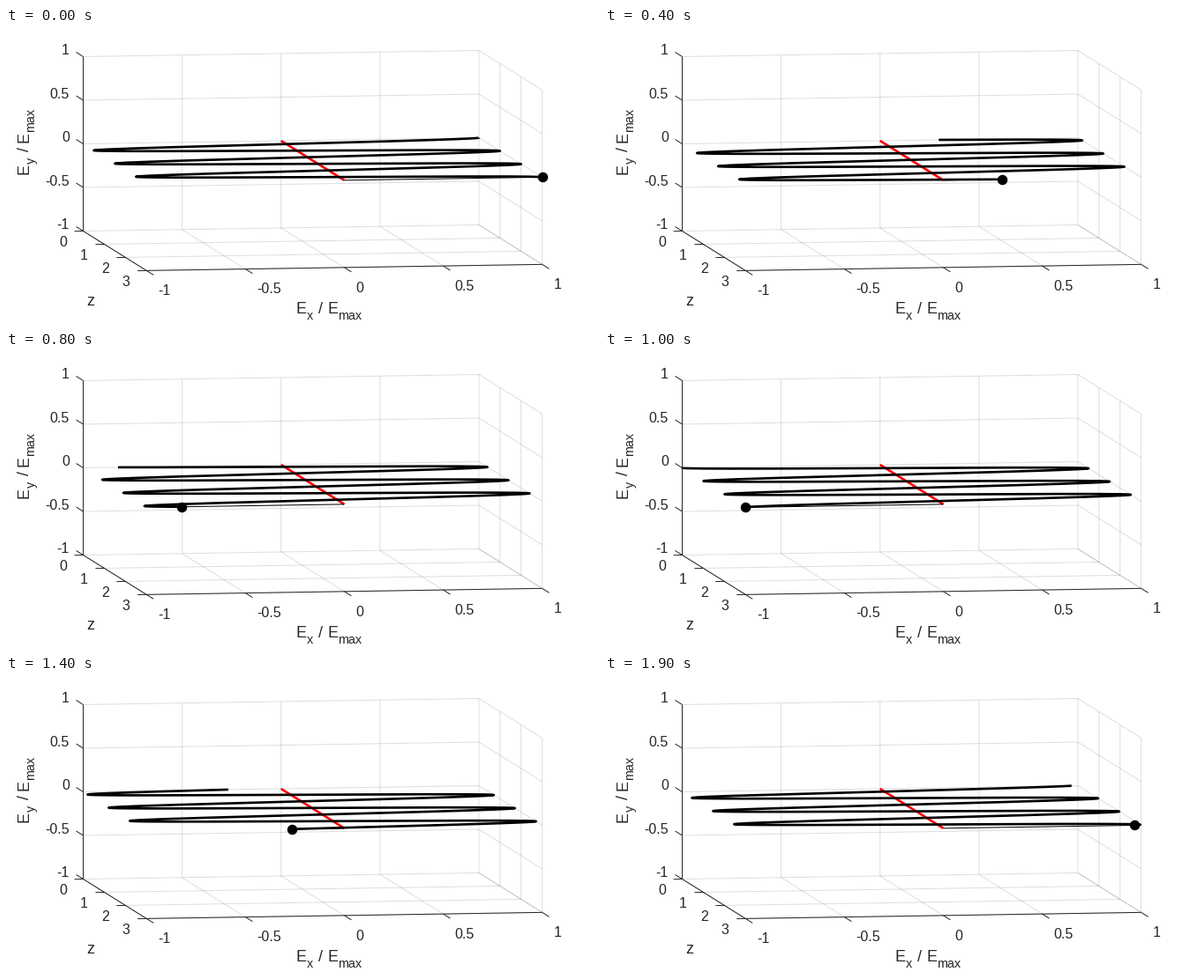
Recreate the animation shown at these times as a matplotlib script. Size 672 by 336 pixels, loop 2000 ms.

```python
import numpy as np
import matplotlib.pyplot as plt
from matplotlib.animation import FuncAnimation

W, H, DPI = 672, 336, 96
FRAMES, INTERVAL = 20, 100
Z_MAX = 3
INK = "0.15"

plt.rcParams["font.family"] = "Liberation Sans"
plt.rcParams["path.snap"] = False
plt.rcParams["lines.solid_capstyle"] = "butt"
fig = plt.figure(figsize=(W / DPI, H / DPI), dpi=DPI, facecolor="white")
ax = fig.add_axes([0, 0, 1, 1])
ax.set_xlim(-0.5, W - 0.5)
ax.set_ylim(H - 0.5, -0.5)
ax.axis("off")


def project(x, y, z):
    """Orthographic view: data coordinates to stage pixels."""
    px = 311.2 + 224.2 * x + 23.9 * z
    py = 127.5 - 3.5 * x - 99 * y + 14.95 * z
    return px, py


def segment(a, b, **style):
    (x0, y0), (x1, y1) = project(*a), project(*b)
    ax.plot([x0, x1], [y0, y1], **style)


def tick(point, dx, dy):
    x, y = project(*point)
    ax.plot([x, x + dx], [y, y + dy], color=INK, lw=0.75, zorder=2)
    return x, y


def number(x, y, value, align):
    ax.text(x, y + 5.8, f"{value:g}", size=12, color=INK,
            ha=align, va="baseline")


def axis_name(x, y, sub, turned=False):
    """Field label with subscripts, laid out along its baseline."""
    runs = [(0, 0, "E", 13.4), (12, 7, sub, 10.7), (26, 0, "/", 13.4),
            (36, 0, "E", 13.4), (48, 7, "max", 10.7)]
    for along, drop, s, size in runs:
        dx, dy = (drop, -along) if turned else (along, drop)
        ax.text(x + dx, y + dy, s, size=size, color=INK, ha="left",
                va="baseline", rotation=90 * turned, rotation_mode="anchor")


# Grid on the back wall, the floor and the right wall
grid = dict(color=INK, alpha=0.15, lw=0.75, zorder=1)
steps = np.linspace(-1, 1, 5)
for v in steps:
    segment((v, -1, 0), (v, 1, 0), **grid)
    segment((v, -1, 0), (v, -1, Z_MAX), **grid)
    segment((-1, v, 0), (1, v, 0), **grid)
    segment((1, v, 0), (1, v, Z_MAX), **grid)
for z in range(1, Z_MAX + 1):
    segment((-1, -1, z), (1, -1, z), **grid)
    segment((1, -1, z), (1, 1, z), **grid)

# Axes, ticks and labels
edge = dict(color=INK, lw=0.75, zorder=2)
segment((-1, 1, 0), (-1, -1, 0), **edge)
segment((-1, -1, 0), (-1, -1, Z_MAX), **edge)
segment((-1, -1, Z_MAX), (1, -1, Z_MAX), **edge)
for v in steps:
    x, y = tick((v, -1, Z_MAX), 8, 5)
    number(x + 13.3, y + 22, v, "left")
    x, y = tick((-1, v, 0), -8, -5)
    number(x - 15.5, y - 8, v, "right")
for z in range(Z_MAX + 1):
    x, y = tick((-1, -1, z), -10, 0.2)
    number(x - 23, y + 12, z, "center")

axis_name(328, 323.5, "x")
axis_name(25, 165.5, "y", turned=True)
ax.text(95, 314, "z", size=13.4, color=INK, ha="center", va="baseline")

# Propagation axis, wave, its tip and the field vector at the front
segment((0, 0, 0), (0, 0, Z_MAX), color="red", lw=2, zorder=3)
vector, = ax.plot([], [], color="black", lw=0.75, zorder=4)
wave, = ax.plot([], [], color="black", lw=2, zorder=5,
                solid_joinstyle="round")
tip, = ax.plot([], [], "o", color="black", ms=8.6, mew=0, zorder=6)

depth = np.linspace(0, Z_MAX, 601)


def draw(i):
    phase = 5 * i / 99
    field = np.cos(2 * np.pi * (depth - phase))
    px, py = project(field, 0, depth)
    ox, oy = project(0, 0, Z_MAX)
    wave.set_data(px, py)
    tip.set_data(px[-1:], py[-1:])
    vector.set_data([ox, px[-1]], [oy, py[-1]])
    return wave, tip, vector


anim = FuncAnimation(fig, draw, frames=FRAMES, interval=INTERVAL,
                     repeat=True, repeat_delay=0, blit=False)
plt.show()
```
